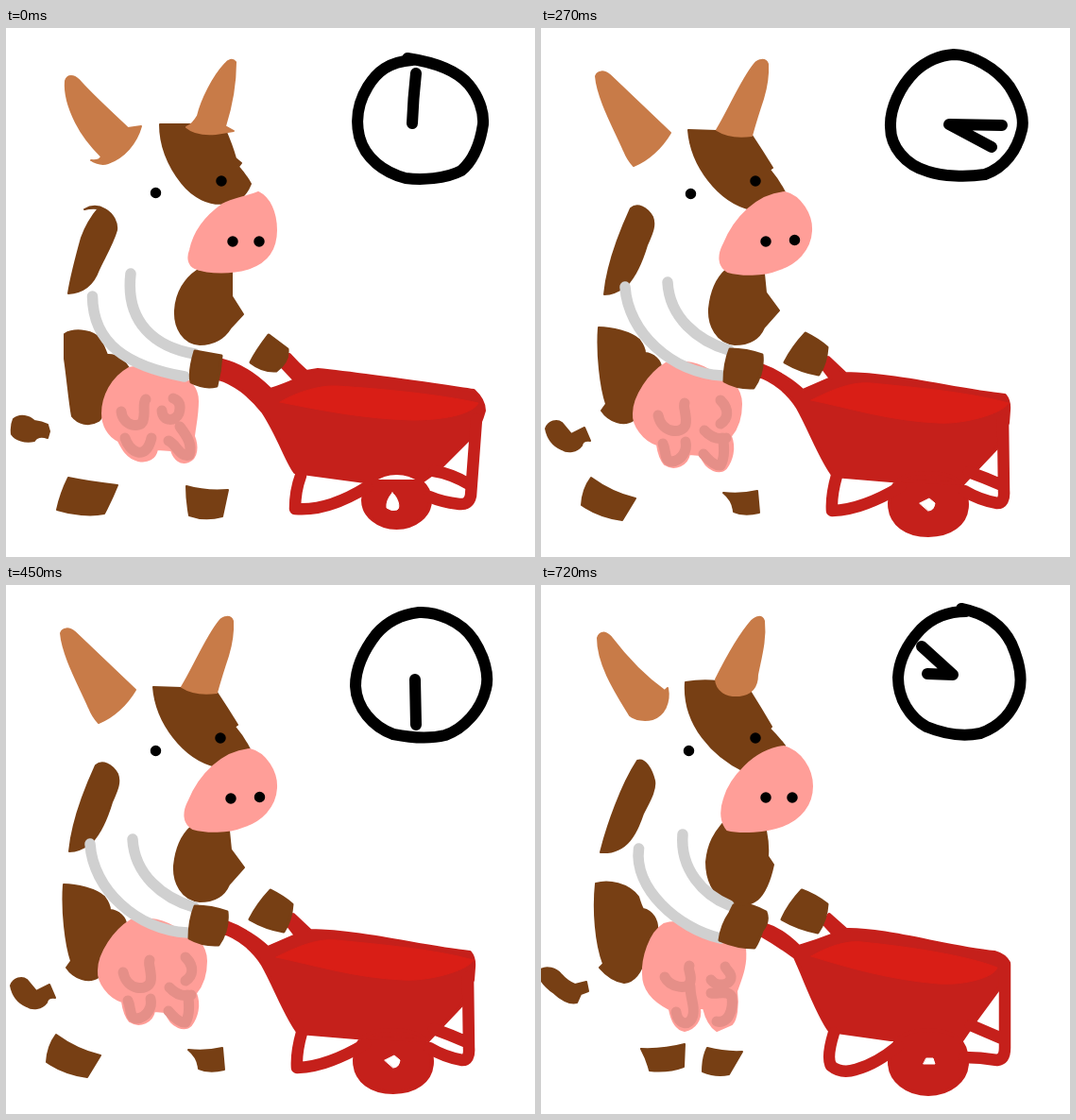
Animation, 560 px wide and 560 px high, one loop 810 ms. Source, as an HTML page:

```html
<!DOCTYPE html>
<html lang="en">
<head>
<meta charset="utf-8">
<title>Cow with wheelbarrow</title>
<style>
  html, body { margin: 0; width: 100%; height: 100%; overflow: hidden; background: #fff; }
  svg { display: block; width: 100%; height: 100%; }
  path { stroke-linecap: round; stroke-linejoin: round; }
</style>
</head>
<body>
<svg viewBox="0 0 560 560"></svg>
<script>
const STEP = 90, STEPS = 9;
const BROWN = '#773f14', RED = '#c5201b';

// Paint order of the parts: name, colour, outline width, filled or not.
const layers = [
  ['patches', BROWN, 2, true],
  ['horns', '#c87b48', 2, true],
  ['snout', '#ff9e98', 2, true],
  ['udder', '#ff9e98', 2, true],
  ['teats', '#e58f88', 11, false],
  ['arms', '#d0d0d0', 11.5, false],
  ['barrow', RED, 4, true],
  ['legs', RED, 12.5, false],
  ['load', '#d91e16', 1, true],
  ['hub', '#fff', 1, true],
  ['hands', BROWN, 3, true],
  ['dots', '#000', 11.5, false],
];

const poses = [
  {
    patches: `M163,102H205L232,108Q239,124 243,138L249,143L246,147Q254,156 259,165C254,178 245,184 235,185C215,189 197,178 186,164C172,146 163,125 163,102Z
      M83,192C90,188 98,188 105,192C114,197 118,207 117,214C113,228 104,243 98,256C93,270 84,280 66,281C69,262 75,240 80,222C86,206 92,198 98,191Q90,190 83,192Z
      M202,257Q220,261 239,258V284L251,303L238,317C230,330 218,335 205,335C188,334 178,318 179,299C180,280 190,265 202,257Z
      M62,324C72,318 88,320 96,326C103,333 105,342 107,346C118,345 126,353 130,360L108,395C104,405 103,412 98,416C88,422 76,419 70,411C67,395 65,370 62,350Z
      M8,414C15,408 25,411 30,416Q38,417 44,420L46,427L44,434C38,432 33,432 30,437C20,439 10,436 6,430Q5,421 8,414Z
      M66,476Q90,481 118,484Q112,499 104,514C90,517 70,515 54,510Q58,492 66,476Z
      M191,485Q212,491 235,489L229,517C218,520 205,520 194,516Q191,500 191,485Z`,
    horns: `M63,56C65,49 72,50 77,55C90,70 112,90 129,106L143,104C138,122 125,137 108,143C102,145 95,143 90,140Q99,141 101,136C93,128 82,116 74,100C65,82 62,68 63,56Z
      M243,36C240,32 235,34 232,38C219,52 207,76 203,93Q198,102 191,105C198,111 210,113 222,112L241,109L232,104C237,88 243,62 243,36Z`,
    snout: 'M267,174C279,180 286,195 286,214C286,235 275,248 258,254C240,260 215,260 200,254C193,251 192,243 195,235C199,216 212,199 229,187C240,181 255,179 267,174Z',
    udder: 'M130,360C150,356 165,360 180,368C195,371 203,382 203,395C203,410 200,422 199,432C203,442 203,455 193,459C185,462 178,457 175,447L160,446C158,456 150,460 140,458C128,455 123,445 119,437C108,432 102,420 102,408C102,390 112,370 130,360Z',
    teats: 'M122,406C124,422 142,424 145,416C148,406 144,398 148,393M165,405C166,418 180,416 183,408C186,398 182,394 177,392M126,434C130,448 148,460 154,434M172,437C180,440 184,455 194,452C198,440 190,430 184,422',
    arms: 'M91.500,284C92,334 128,358 189,369M132,260C126,312 158,338 200,345',
    barrow: `M229,352C250,357 268,371 280,383Q295,378 306,373L291,357Q294,348 300,346Q308,355 318,364L330,362C380,367 440,376 495,384Q506,394 506,405Q502,420 494,431L457,468L440,480H380L306,470C298,460 288,430 272,406C258,388 240,375 225,371Z
      M378,500a35.500,29 0 1 0 71,0a35.500,29 0 1 0 -71,0Z`,
    legs: 'M498,414L492,495Q490,505 480,504Q462,502 448,496M453,469Q472,472 490,483M312,474Q306,490 306,509Q340,512 382,486',
    load: 'M290,396C310,384 335,378 350,379C400,382 460,388 500,397C495,407 470,415 430,415C380,414 330,404 290,396Z',
    hub: 'M409,492C415,497 418,508 414,510Q408,512 403,508Q402,500 409,492Z',
    hands: `M200,342L228,347Q227,363 223,379Q210,382 196,375C194,366 197,352 200,342Z
      M278,325L298,340C299,350 293,358 286,363Q272,364 259,354Q265,342 278,325Z`,
    dots: 'M158.500,174.500h0M228,162h0M240,226h0M268,226h0',
  },
  {
    patches: `M156,108L186,109L222,112Q234,130 245,148L242,150Q252,162 258,174L222,192C188,184 159,146 156,108Z
      M95,191C102,185 112,190 118,200C122,210 116,220 112,230C106,250 98,265 90,273Q78,282 67,282C70,250 84,215 95,191Z
      M196,256Q215,262 236,260L238,280L252,299L236,317C230,331 218,335 205,335C186,333 177,315 178,297C180,278 186,265 196,256Z
      M61,317C75,317 95,322 104,330Q110,338 110,344C120,345 126,352 127,358L100,395L98,415C88,422 72,417 64,405L69,398C63,380 59,345 61,317Z
      M5,424C8,416 17,414 22,418L32,430L46,423L52,437Q44,436 43,442C38,449 28,450 22,446Q8,440 5,424Z
      M53,476Q75,492 100,498L86,521Q62,518 43,505Q44,488 53,476Z
      M193,492Q212,494 229,490L231,513Q215,517 204,512Q203,500 193,492Z`,
    horns: `M58,51C60,45 67,45 73,50L137,111C128,126 114,140 98,146Q92,140 88,130C78,107 60,75 58,51Z
      M240,38C238,32 230,33 226,38C212,55 200,85 186,108Q200,117 223,114Q228,96 235,75Q241,55 240,38Z`,
    snout: 'M258,174C275,178 287,198 286,215C285,235 270,250 250,256C235,262 212,262 198,258C187,252 188,240 193,230C205,200 230,176 258,174Z',
    udder: 'M132,355C150,350 170,356 182,365C200,368 212,382 212,398C212,415 207,425 201,432C206,445 202,458 196,466C190,472 175,470 169,452L157,451C155,462 142,469 131,462C126,456 124,448 123,441C108,436 97,420 98,408C98,390 115,365 132,355Z',
    teats: 'M124,410C128,430 150,430 153,420C155,410 150,402 152,397M190,394C200,404 198,414 190,419M173,426Q183,437 196,434M129,440C133,448 130,458 138,459C150,458 155,446 153,438M172,451Q183,464 190,463C195,455 194,440 192,434',
    arms: 'M89,274C92,322 138,365 192,368M134,269C136,306 165,331 199,341',
    barrow: `M233,357C250,363 268,375 277,384L307,371L297,358L304,349L322,366C380,367 440,384 491,389Q496,395 495,405L494,418L482,445L447,482L370,479L310,474C298,460 285,425 272,402C262,386 245,372 230,368Z
      M369,503C369,480 380,471 410,471S451,482 451,504S432,537 410,537S369,526 369,503Z`,
    legs: 'M489,415L490,490Q491,503 483,503Q465,500 448,490M453,470Q470,476 488,484M313,474Q307,495 308,511Q340,510 380,486',
    load: 'M286,394C310,382 330,374 350,376C400,381 450,385 495,397C488,409 445,420 420,418C370,416 325,402 286,394Z',
    hub: 'M401,503L411,498L417,503Q416,511 410,511Z',
    hands: `M200,340Q218,340 234,346Q236,365 225,381Q208,382 194,374Q194,355 200,340Z
      M280,323Q294,330 303,338Q302,355 294,367Q275,364 258,354Q266,338 280,323Z`,
    dots: 'M158.500,175.500h0M227,162h0M238,226h0M268.500,224.500h0',
  },
  {
    patches: `M153,103Q170,100 188,102L221,112Q233,131 244,150L242,152Q250,160 258,170L215,197C183,182 150,148 153,103Z
      M102,186C110,183 117,195 120,207C122,217 114,230 108,242C102,260 92,285 63,283C70,255 85,212 102,186Z
      M194,251Q215,263 238,260Q241,275 240,287L246,296C243,310 238,325 229,333C220,340 208,341 198,335C182,328 175,312 175,293C177,273 184,262 194,251Z
      M58,316C72,312 92,316 103,330Q106,340 108,343C118,345 124,355 123,366L109,395C107,410 98,420 88,421C76,419 68,412 62,405L66,401C58,380 55,345 58,316Z
      M0,407C6,403 16,406 21,412Q28,420 36,423L48,420L50,430L42,433L38,442C30,444 20,438 14,432Q4,425 0,418Z
      M106,491Q130,492 152,486L151,510Q135,516 115,514Q112,502 106,491Z
      M176,490Q195,495 213,494L199,518Q185,521 171,515Q171,500 176,490Z`,
    horns: `M60,56C62,49 68,49 74,55C90,76 110,97 131,112L134,109C137,125 130,138 118,142C110,144 100,143 94,138C80,115 60,85 60,56Z
      M236,38C234,32 228,33 223,38C208,55 195,80 185,100C186,112 196,118 210,117C225,115 229,106 229,95C233,75 238,58 236,38Z`,
    snout: 'M257,171C275,176 287,195 287,213C287,232 275,248 255,255C238,261 212,263 197,259C190,250 190,238 194,226C200,205 225,175 257,171Z',
    udder: 'M130,359C145,354 158,359 166,366C185,368 205,375 216,385C218,402 212,416 207,430C209,445 207,460 202,465L186,472C180,468 175,460 172,448H168C170,460 163,470 152,472C142,470 138,460 136,449C122,442 108,430 108,412C107,395 115,368 130,359Z',
    teats: 'M131,415C136,425 155,430 158,420C160,412 155,408 157,403M180,418C186,426 200,424 201,416C202,410 196,408 195,404M143,452C145,466 158,468 161,455C163,445 158,438 158,425M186,462C198,465 204,450 202,436C198,428 186,434 180,432',
    arms: 'M103.500,279C98,321 144,363 190,374M150,264C147,301 172,328 199,339',
    barrow: `M238,360C252,364 265,375 273,383Q292,377 310,370L299,358L305,349L323,365C365,364 430,384 480,389Q491,392 495,400V413L459,462L446,481H370L306,472C293,455 281,420 269,394Q250,380 234,371Z
      M369,505C369,485 380,471 410,471S451,485 451,505S432,539 410,539S369,525 369,505Z`,
    legs: 'M491,402V490Q491,502 483,503Q465,500 448,500M455,466L490,481M310,474Q302,500 307,509Q318,518 333,513Q355,507 378,488',
    load: 'M286,393C305,382 325,376 340,378C390,383 450,392 483,405C480,415 450,424 420,422C370,418 325,405 286,393Z',
    hub: 'M408,501H415L417,507H405Z',
    hands: `M204,339Q218,335 238,346Q242,356 234,366Q230,378 226,384Q208,384 189,376Q191,360 200,347Z
      M276,323Q290,328 303,338Q302,355 293,368Q272,364 255,354Q262,338 276,323Z`,
    dots: 'M156.500,175.500h0M227,162h0M238,225h0M266,225h0',
  },
];

// Wobbly clock rims, one or two steps each.
const rims = [
  'M425,32C445,35 475,42 490,60C500,72 506,88 505,102C502,122 495,140 482,151C465,160 440,161 423,159C400,153 380,138 374,115C370,98 372,80 383,62C393,46 405,36 430,34',
  'M430,28C455,30 482,42 493,60C503,78 509,95 507,110C503,130 490,148 475,153C455,159 430,159 412,154C390,145 372,128 370,108C369,85 376,64 391,49C402,38 420,31 445,31',
  'M437,28C455,28 482,42 496,62C506,78 512,95 509,108C504,130 490,148 470,155C450,158 425,157 410,152C385,145 370,125 370,105C369,85 380,62 396,46C408,35 422,29 437,28',
  'M437,29C455,28 482,38 495,58C506,75 512,95 508,110C503,132 485,152 465,159C445,164 425,161 410,158C388,150 371,130 370,107C370,88 378,70 392,52C404,38 420,31 437,29',
  'M437,25C455,29 478,37 492,57C503,75 510,92 507,107C503,130 490,148 470,156C450,162 425,161 408,157C388,148 372,125 373,100C373,80 382,62 397,46C410,34 424,28 437,27',
  'M445,25C470,30 488,42 498,62C506,80 510,98 506,113C500,135 485,150 465,157C445,161 425,157 408,150C390,140 378,120 378,98C379,78 388,62 402,47C415,34 430,28 450,28',
];
const rimOrder = [0, 1, 1, 2, 2, 3, 4, 4, 5];
const clockHands = [
  'M430,101Q431,75 434,48',
  'M457,57L431,101L462,80',
  'M480,69L432,100L476,102',
  'M488,103L432,102L477,126',
  'M470,138L433,101L455,140',
  'M433,100L434,148',
  'M407,136L433,100L424,133',
  'M392,108L434,98L406,117',
  'M403,65L436,95L409,94',
];

const svg = document.querySelector('svg');

function addPath(color, width, filled) {
  const path = document.createElementNS('http://www.w3.org/2000/svg', 'path');
  path.setAttribute('stroke', color);
  path.setAttribute('stroke-width', width);
  path.setAttribute('fill', filled ? color : 'none');
  svg.append(path);
  return path;
}

const parts = layers.map(([name, ...look]) => [name, addPath(...look)]);
const clock = addPath('#000', 12, false);
let shown = -1;

function draw() {
  const step = Math.floor(performance.now() / STEP) % STEPS;
  if (step !== shown) {
    const pose = poses[Math.floor(step / 3)];
    for (const [name, path] of parts) path.setAttribute('d', pose[name]);
    clock.setAttribute('d', rims[rimOrder[step]] + clockHands[step]);
    shown = step;
  }
  requestAnimationFrame(draw);
}
draw();
</script>
</body>
</html>
```
